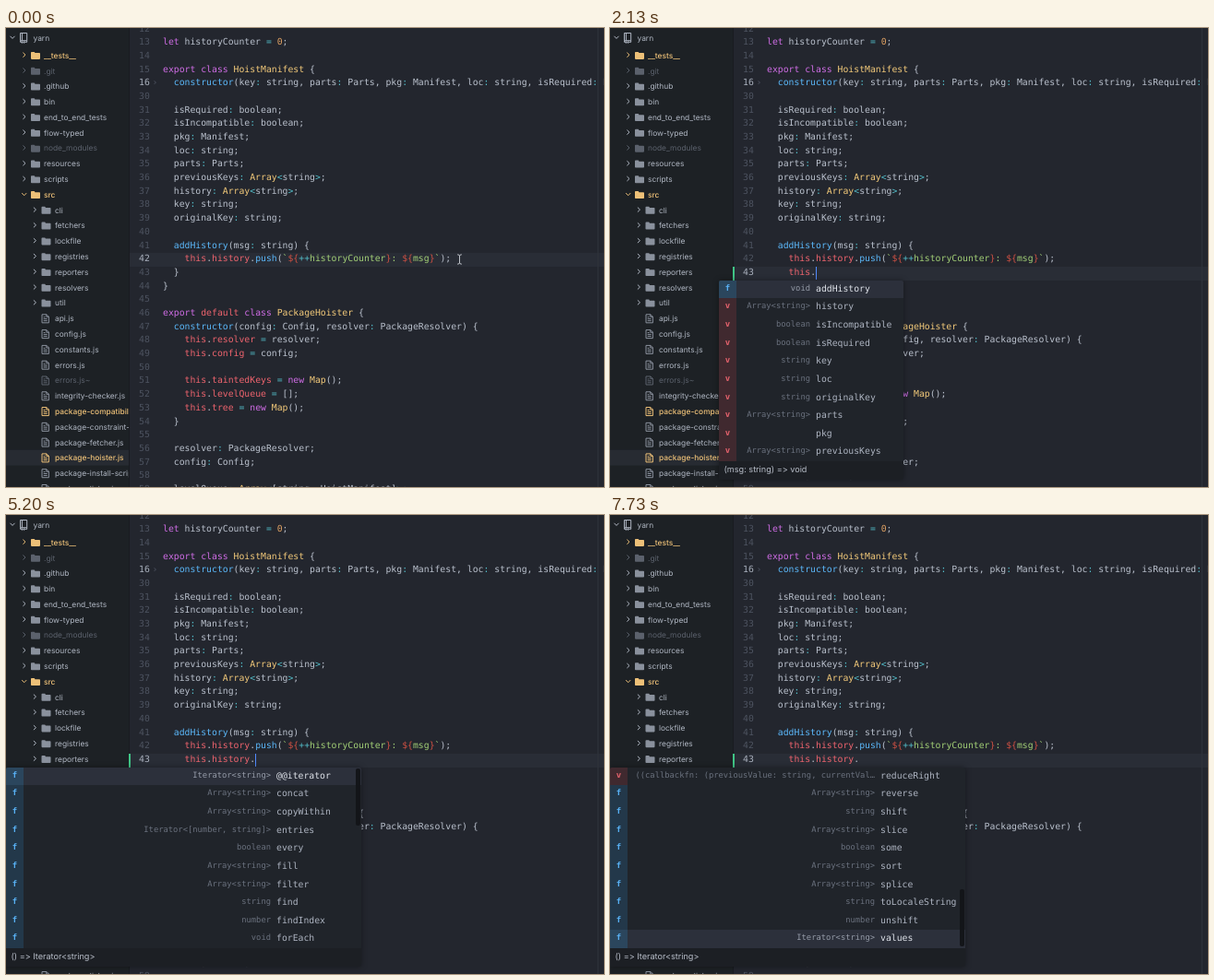
Recreate the animation shown at these times as an HTML page. Size 648 by 498 pixels, loop 8000 ms.

```html
<!DOCTYPE html>
<html lang="en">
<head>
<meta charset="utf-8">
<title>Editor autocomplete</title>
<style>
  html, body { margin: 0; width: 100%; height: 100%; overflow: hidden; background: #23262e; }
  #stage {
    position: absolute; left: 0; top: 0; width: 648px; height: 498px; overflow: hidden;
    background: #23262e; color: #bac1cd; text-rendering: geometricPrecision;
    font: 9.79px/14.69px "DejaVu Sans Mono", monospace;
    font-variant-ligatures: none;
  }
  #stage * { box-sizing: border-box; }
  #stage div, #tree { position: absolute; }
  #tree { left: 0; top: 0; background: #1d2125; }
  #tree text { font: 8.4px Inter, sans-serif; }
  #tree .changed { font-weight: 500; }
  #edge { left: 133px; top: 0; width: 1px; height: 498px; background: #191b20; }
  #guide { left: 641px; top: 0; width: 1px; height: 498px; background: #2e323a; }
  #active { left: 134px; width: 514px; height: 14.69px; background: #292d36; }
  #added { left: 133px; top: 258.6px; width: 2px; height: 15px; background: #40c586; }
  #cursor { top: 258.6px; width: 1.4px; height: 14.8px; background: #528bff; }
  #mouse { left: 488px; top: 244.8px; }
  .line { left: 170px; white-space: pre; }
  .num { left: 134px; width: 21.8px; text-align: right; color: #4d5360; }
  .num.on { color: #a9b0bd; }
  .kw { color: #d06de6; } .red { color: #ef646e; } .fn { color: #5bb8fa; }
  .type { color: #f3ca7a; } .op { color: #54bfcb; } .n { color: #dfa264; }
  .str { color: #a2cf76; } .emb { color: #cd5043; }

  .pop {
    top: 273.7px; background: #20242a; border-radius: 2px; overflow: hidden;
    box-shadow: 0 0 6px rgba(0, 0, 0, .38); visibility: hidden;
  }
  .row { left: 0; width: 100%; height: 19.64px; line-height: 19.64px; white-space: pre; color: #adb4c1; }
  .row b { color: #e4e8ee; }
  .row .kind { left: 0; top: 0; width: 19px; height: 100%; text-align: center; font-size: 9px; font-weight: bold; }
  .row .label { top: 0; font-size: 8.81px; color: #6a717e; }
  .row .word { top: 0; }
  .v .kind { color: #e4626c; background: #40292f; }
  .f .kind { color: #58b0f3; background: #23384a; }
  .sel { background: #2c303b; color: #dfe3ea; }
  .sel b { color: #fff; }
  .sel .label { color: #969ca9; }
  .sel.v .kind { background: #4e2f37; }
  .sel.f .kind { background: #2b465d; }
  .desc {
    left: 0; width: 100%; padding: 3.5px 5.5px; background: #1c1f24; color: #b8bec9;
    font: 9.1px/12.6px Inter, sans-serif; font-feature-settings: "calt" 0; white-space: pre;
  }
  .thumb { right: 1px; width: 5px; height: 62px; border-radius: 2px; background: #131519; }
</style>
</head>
<body>
<div id="stage">
  <svg id="tree" width="133" height="498"></svg>
  <div id="active"></div>
  <div id="edge"></div>
  <div id="guide"></div>
  <div id="added"></div>
  <div id="nums"></div>
  <div id="above"></div>
  <div id="typed" class="line"></div>
  <div id="below"></div>
  <div id="cursor"></div>
  <svg id="mouse" style="position:absolute" width="7" height="12" fill="none">
    <path d="M1.2.8Q3.5.8 3.5 2.5Q3.5.8 5.8.8M3.5 2v8M1.2 11.2Q3.5 11.2 3.5 9.5Q3.5 11.2 5.8 11.2" stroke="#bfc3ca"/>
  </svg>
</div>
<script>
const $ = id => document.getElementById(id);
const LH = 14.69, TOP = 9.2, CH = 9.79 * 0.602, ROW = 19.64, ACTIVE = 17;
const lineY = k => TOP + k * LH;
const esc = s => s.replace(/&/g, '&amp;').replace(/</g, '&lt;').replace(/>/g, '&gt;');
const span = (cls, s) => `<span class="${cls}">${esc(s)}</span>`;

function add(parent, cls, html, style) {
  const el = document.createElement('div');
  el.className = cls;
  el.innerHTML = html;
  Object.assign(el.style, style);
  return parent.appendChild(el);
}

// Syntax colouring
const TOKENS = new RegExp([
  '(?<str>`[^`]*`)',
  '(?<kw>\\b(?:export|class|let|new)\\b)',
  '(?<type>\\b(?:Array|Map)\\b|(?<=class )\\w+)',
  '(?<fn>\\b\\w+(?=\\())',
  '(?<red>\\b(?:this|default)\\b|(?<=\\.)\\w+)',
  '(?<op>[:=<>])',
  '(?<n>\\b\\d+\\b)',
  '(?<rest>\\w+|[^])'
].join('|'), 'g');

const template = s => s.split(/(\$\{|\}|\+\+)/)
  .map(p => span(p === '++' ? 'op' : /^(\$\{|\})$/.test(p) ? 'emb' : 'str', p)).join('');

function colour(src) {
  let out = '';
  for (const m of src.matchAll(TOKENS)) {
    const cls = Object.keys(m.groups).find(k => m.groups[k] !== undefined);
    out += cls === 'str' ? template(m[0]) : cls === 'rest' ? esc(m[0]) : span(cls, m[0]);
  }
  return out;
}

const above = [
  'let historyCounter = 0;', '', 'export class HoistManifest {',
  '  constructor(key: string, parts: Parts, pkg: Manifest, loc: string, isRequired: boolean',
  '', '  isRequired: boolean;', '  isIncompatible: boolean;', '  pkg: Manifest;', '  loc: string;',
  '  parts: Parts;', '  previousKeys: Array<string>;', '  history: Array<string>;', '  key: string;',
  '  originalKey: string;', '', '  addHistory(msg: string) {',
  '    this.history.push(`${++historyCounter}: ${msg}`);'
];
const below = [
  '  }', '}', '', 'export default class PackageHoister {',
  '  constructor(config: Config, resolver: PackageResolver) {',
  '    this.resolver = resolver;', '    this.config = config;', '',
  '    this.taintedKeys = new Map();', '    this.levelQueue = [];', '    this.tree = new Map();',
  '  }', '', '  resolver: PackageResolver;', '  config: Config;', '',
  '  levelQueue: Array<[string, HoistManifest]>;'
];
above.forEach((s, i) => add($('above'), 'line', colour(s), { top: lineY(i) + 'px' }));
below.forEach((s, i) => add($('below'), 'line', colour(s), { top: lineY(ACTIVE + i) + 'px' }));
$('typed').style.top = lineY(ACTIVE) + 'px';

const nums = [];
for (let k = -1; k < 34; k++)
  nums[k + 1] = add($('nums'), 'num', k < 4 ? 13 + k : 26 + k, { top: lineY(k) + 'px' });
add($('nums'), 'num', '›', { top: lineY(3) + 'px', width: '30.5px' });

// File tree: ">" closed folder, "v" open folder, "-" file; "!" modified, "~" ignored
const tree = [
  '1>!__tests__', '1>~.git', '1> .github', '1> bin', '1> end_to_end_tests', '1> flow-typed',
  '1>~node_modules', '1> resources', '1> scripts', '1v!src', '2> cli', '2> fetchers', '2> lockfile',
  '2> registries', '2> reporters', '2> resolvers', '2> util', '2- api.js', '2- config.js',
  '2- constants.js', '2- errors.js', '2-~errors.js~', '2- integrity-checker.js',
  '2-!package-compatibility.js', '2- package-constraint-resolver.js', '2- package-fetcher.js',
  '2-!package-hoister.js', '2- package-install-scripts.js', '2- package-linker.js'
];
const tint = { '!': '#edc078', '~': '#5b616c', ' ': '#b0b7c3' };
const iconTint = { ...tint, ' ': '#8a919d' };
const path = (x, y, d, c, fill) =>
  `<path transform="translate(${x} ${y})" d="${d}" ` +
  (fill ? `fill="${c}"/>` : `fill="none" stroke="${c}" stroke-width="1"/>`);
const arrow = (x, y, open, c) => path(x, y, open ? 'M-2.5-1.2L0 1.4L2.5-1.2' : 'M-1.3-2.5L1.3 0L-1.3 2.5', c);
const label = (x, y, s, kind) =>
  `<text x="${x}" y="${y + 3.05}" fill="${tint[kind]}"${kind === '!' ? ' class="changed"' : ''}>${s}</text>`;

let svg = '<rect y="457.8" width="133" height="16.8" fill="#272b32"/>' +
  arrow(7, 10, true, tint[' ']) +
  path(15, 5, 'M.5.5h7.2v8.2H.5zM2.4.5v8.2M.5 8.7v1.6h1.8M5.2 10.3h2.5v-1.6M2.3 9.2v2.2l1.2-.9l1.2.9v-2.2', tint[' ']) +
  label(29.5, 10.5, 'yarn', ' ');
tree.forEach((s, i) => {
  const y = 29.7 + i * 16.79, x = s[0] === '1' ? 27 : 38.5, c = iconTint[s[2]];
  svg += s[1] === '-'
    ? path(x, y - 4.8, 'M.5.5h5l2.4 2.4v6.6H.5zM5.3.5v2.6h2.6M2.2 3.4h1.8M2.2 5.3h4M2.2 7.3h4', c)
    : arrow(x - 7.3, y - .5, s[1] === 'v', tint[s[2]]) +
      path(x, y - 4, 'M0 1Q0 .2.8.2H3.4Q4.2.2 4.4 1.4H9.2Q10 1.4 10 2.2V7.4Q10 8.2 9.2 8.2H.8Q0 8.2 0 7.4z', c, true);
  svg += label(s[0] === '1' ? 41 : 53, y, s.slice(3), s[2]);
});
$('tree').innerHTML = svg;

// Suggestion lists; a row is kind|label|word
const thRows = ['v|[type: HoistManifest]|this',
  'v|{basename: (path: string, ext?: string) => strin…|path', 'f|number|sortAlpha'];
const hiRows = ['v|Array<string>|history', 'f|void|addHistory'];
const hoistRows = [...hiRows, 'v||historyCounter', 'v||HoistManifest', 'v||PackageHoister', 'v||hoistManifest',
  'v||HoistManifestTuples', 'v||hoistedManifest', 'v||hoistedPatternStates', 'v||shiftHoistParts'];
const iterDesc = '() => Iterator<string>', selfDesc = '[type: HoistManifest]';
const pops = {
  t: { x: 0, r: 543, w: 293.5, q: 't', desc: selfDesc, rows: [...thRows, 'f|boolean|invariant', 'v|string|parts',
    'v|Array<string>|patterns', 'v||taintedKeys', 'v||tree', 'f|void|taintParents',
    'v||TransitiveDependencyManifestTupleIterator'] },
  th: { x: 0, r: 355, w: 293.5, q: 'th', desc: selfDesc, rows: thRows },
  thi: { x: 47, r: 353, w: 194, q: 'thi', desc: selfDesc,
    rows: [thRows[0], 'v||existingPatternHoistIndex', 'v||switchHoistInfo'] },
  self: { x: 48, r: 230, w: 194, q: 'this', desc: selfDesc, rows: [thRows[0]] },
  members: { x: 118, r: 317.5, w: 223, q: '', desc: '(msg: string) => void', rows: ['f|void|addHistory',
    'v|Array<string>|history', 'v|boolean|isIncompatible', 'v|boolean|isRequired', 'v|string|key', 'v|string|loc',
    'v|string|originalKey', 'v|Array<string>|parts', 'v||pkg', 'v|Array<string>|previousKeys'] },
  h: { x: 118, r: 293, w: 223, q: 'h', desc: 'Array<string>', rows: hiRows },
  hi: { x: 123, r: 298.5, w: 228.7, q: 'hi', desc: 'Array<string>', rows: hiRows },
  his: { x: 118, r: 350, w: 223, q: 'his', desc: 'Array<string>', rows: hoistRows },
  hist: { x: 120, r: 350, w: 223, q: 'hist', desc: 'Array<string>', rows: hoistRows },
  first: { x: 0, r: 385, w: 293, q: '', desc: iterDesc, thumb: 1, rows: ['f|Iterator<string>|@@iterator',
    'f|Array<string>|concat', 'f|Array<string>|copyWithin', 'f|Iterator<[number, string]>|entries', 'f|boolean|every',
    'f|Array<string>|fill', 'f|Array<string>|filter', 'f|string|find', 'f|number|findIndex', 'f|void|forEach'] },
  last: { x: 0, r: 385, w: 293, q: '', desc: iterDesc, thumb: 132, sel: 9, rows: [
    'v|((callbackfn: (previousValue: string, currentVal…|reduceRight', 'f|Array<string>|reverse', 'f|string|shift',
    'f|Array<string>|slice', 'f|boolean|some', 'f|Array<string>|sort', 'f|Array<string>|splice',
    'f|string|toLocaleString', 'f|number|unshift', 'f|Iterator<string>|values'] },
  map: { x: 174, r: 314, w: 270, q: 'm', rows: ['f|Array<U>|map', 'f|boolean|some'],
    desc: '<U>(callbackfn: (value:\nstring, index: number, array:\nArray<string>) => U, thisA …' }
};

function mark(word, query) {
  let i = 0;
  return [...word].map(c => c.toLowerCase() === query[i] ? (i++, `<b>${c}</b>`) : esc(c)).join('');
}

for (const p of Object.values(pops)) {
  const h = p.rows.length * ROW, lines = p.desc.split('\n').length;
  p.el = add($('stage'), 'pop', '', { left: p.x + 'px', width: p.r - p.x + 'px', height: h + 7 + lines * 12.6 + 'px' });
  p.rows.forEach((s, i) => {
    const [kind, type, word] = s.split('|');
    const row = add(p.el, `row ${kind}${i === (p.sel || 0) ? ' sel' : ''}`, '', { top: i * ROW + 'px' });
    add(row, 'kind', kind);
    add(row, 'label', esc(type), { right: p.r - p.w + 6 + 'px' });
    add(row, 'word', mark(word, p.q), { left: p.w - p.x + 'px' });
  });
  add(p.el, 'desc', esc(p.desc), { top: h + 'px' });
  if (p.thumb) add(p.el, 'thumb', '', { top: p.thumb + 'px' });
}

// time, typed text, open list, cursor hidden
const self = 'this.', hist = 'this.history', dot = hist + '.';
const steps = [
  [0, null, '', 1], [270, ''], [730, 't'], [800, 't', 't'], [870, 'th', 't'], [1000, 'thi', 'th'], [1070, 'thi', 'thi'],
  [1400, 'this', 'thi'], [1470, 'this', 'self'], [1870, self, 'self'], [1930, self], [2130, self, 'members'],
  [2400, self, 'members', 1], [2800, self + 'h', 'members'], [2870, self + 'hi', 'h'], [3000, self + 'his', 'hi'],
  [3130, self + 'his', 'his'], [3400, self + 'hist', 'his'], [3530, self + 'hist', 'hist'], [3670, hist],
  [4130, hist, '', 1], [4530, hist], [4800, dot], [4930, dot, 'first'], [5270, dot, 'first', 1], [5730, dot, 'first'],
  [6070, dot, 'first', 1], [6130, dot + 'm', 'first'], [6270, dot + 'm', 'map'], [6600, dot + 'm', 'map', 1],
  [7000, dot + 'm', 'map'], [7270, dot, 'map'], [7400, dot, 'first'], [7670, dot, 'first', 1], [7730, dot, 'last', 1]
];
const show = (el, on) => { el.style.visibility = on ? 'visible' : 'hidden'; };

function render(t) {
  const [, text, list, off] = steps.findLast(s => s[0] <= t);
  const open = text !== null, row = open ? ACTIVE : ACTIVE - 1;
  $('active').style.top = lineY(row) + 'px';
  nums.forEach((n, i) => n.classList.toggle('on', i === row + 1));
  // line 16 is folded and stays lit
  nums[4].classList.add('on');
  $('below').style.top = (open ? LH : 0) + 'px';
  $('typed').innerHTML = colour('    ' + (text || ''));
  $('cursor').style.left = 170 + (4 + (text || '').length) * CH - .4 + 'px';
  show($('cursor'), !off);
  show($('mouse'), !open);
  show($('added'), t >= 530);
  for (const k in pops) show(pops[k].el, k === list);
}

const start = performance.now();
(function frame() {
  render((performance.now() - start) % 8000);
  requestAnimationFrame(frame);
})();
</script>
</body>
</html>
```
